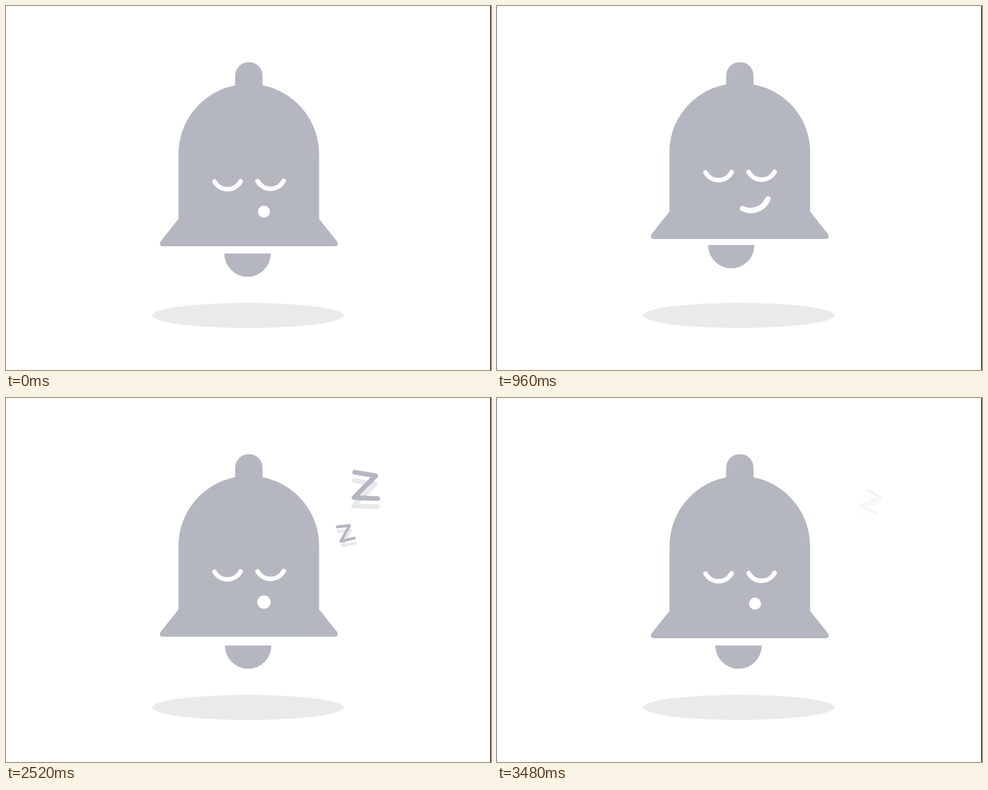
An HTML page for the animation above (3630 ms loop, 800 px wide and 600 px high).

```html
<!DOCTYPE html>
<html lang="en">
<head>
<meta charset="utf-8">
<title>Sleeping bell</title>
<style>
  html, body { margin: 0; width: 100%; height: 100%; overflow: hidden; background: #fff; }
  svg { display: block; width: 100%; height: 100%; }
  .line { fill: none; stroke: #fff; stroke-linecap: round; stroke-linejoin: round; }
</style>
</head>
<body>
<svg viewBox="0 0 800 600">
  <defs>
    <path id="z" d="M-20.5-20.5L14.5-18L-17.5 21.5L21.5 19.5"/>
    <g id="zz" class="line" stroke-width="8">
      <use href="#z" x=".5" y="13.5" stroke="#e9e9eb"/>
      <use href="#z" stroke="#b4b7c0"/>
    </g>
  </defs>
  <ellipse cx="399" cy="510" rx="158" ry="20.7" fill="#eaeaea"/>
  <use id="z1" href="#zz"/>
  <use id="z2" href="#zz"/>
  <g fill="#b4b7c0">
    <path d="M378 140V115a22.6 22.6 0 0 1 45.2 0V140z"/>
    <path id="body"/>
    <path id="clapper" d="M-38.3 0H38.3A38.3 38.3 0 0 1-38.3 0z"/>
  </g>
  <path id="eyes" class="line" stroke-width="7.5"
    d="M344 289.5A24.5 24.5 0 0 0 387 289M415 288.7A24.5 24.5 0 0 0 458 288.2"/>
  <path id="smile" class="line" stroke-width="9" d="M-21 8A31 31 0 0 0 21-8"/>
  <circle id="mouth" cx="425.5" fill="#fff"/>
  <rect x="798.7" width="1.3" height="600" fill="#111"/>
</svg>
<script>
const LOOP = 3630, STEP = 30, LIFE = 1200;
const set = (id, attrs) => {
  const el = document.getElementById(id);
  for (const k in attrs) el.setAttribute(k, attrs[k]);
};
const ramp = (t, a, b) => Math.min(1, Math.max(0, (t - a) / (b - a)));
const sine = s => (1 - Math.cos(Math.PI * s)) / 2;

// A letter drifts up and right, turning and growing, then shrinks and fades
function drawLetter(id, t, { start, x, y, dx, dy, turn, shrink }) {
  const u = (t - start) / LIFE;
  const rise = 1.13 * u - .13 * u * u;
  const size = Math.max(0, Math.min(1, .36 + 1.06 * u, 1 - shrink * (u - .55)));
  set(id, {
    opacity: u < 0 ? 0 : 1 - ramp(u, .75, 1.05),
    transform: `translate(${x + dx * u} ${y - dy * rise})
      rotate(${turn * sine(u) - 15}) scale(${size})`
  });
}

function draw(t) {
  const up = t < 1785;
  const lift = sine(ramp(t, 30, 640)) - sine(ramp(t, 1785, 2830));
  const drop = sine(ramp(t, 1815, 2520));
  const swing = sine(1 - (1 - ramp(t, 60, 990)) ** 1.64) - drop;
  const over = drop - sine(ramp(t, 2520, 2850));
  const smile = ramp(t, 210, 285) - ramp(t, 1770, 1845);
  const d = -12 * lift;

  set("body", { d: `M284.5 ${244.5 - 4.5 * lift}a116 ${116 - 3 * lift} 0 0 1 232 0
    V${351 + d}L546 ${388 + d}q3.5 8-4 8H259q-7.5 0-4-8L284.5 ${351 + d}z` });
  set("clapper", { transform: `translate(${398.4 - 12 * swing + over} ${408 - 14 * swing})` });
  set("eyes", { transform: `translate(0 ${1.25 * d})` });
  set("smile", {
    opacity: smile,
    transform: `translate(426 ${338 + d}) scale(${up ? .66 + .34 * swing : 1})`
  });
  set("mouth", { opacity: (1 - smile) ** 2, cy: 339 + d, r: 10 + 5 * lift });

  drawLetter("z1", t, { start: 1800, x: 548, y: 211.5, dx: 76, dy: 106, turn: 31, shrink: .13 });
  drawLetter("z2", t, { start: 2265, x: 545, y: 237.5, dx: 72, dy: 66, turn: 45, shrink: .7 });
}

let start;
function frame(now) {
  start ??= now;
  const t = Math.floor(((now - start) % LOOP) / STEP) * STEP;
  draw(t < 60 ? 0 : Math.min(t, 3480));
  requestAnimationFrame(frame);
}
draw(0);
requestAnimationFrame(frame);
</script>
</body>
</html>
```
